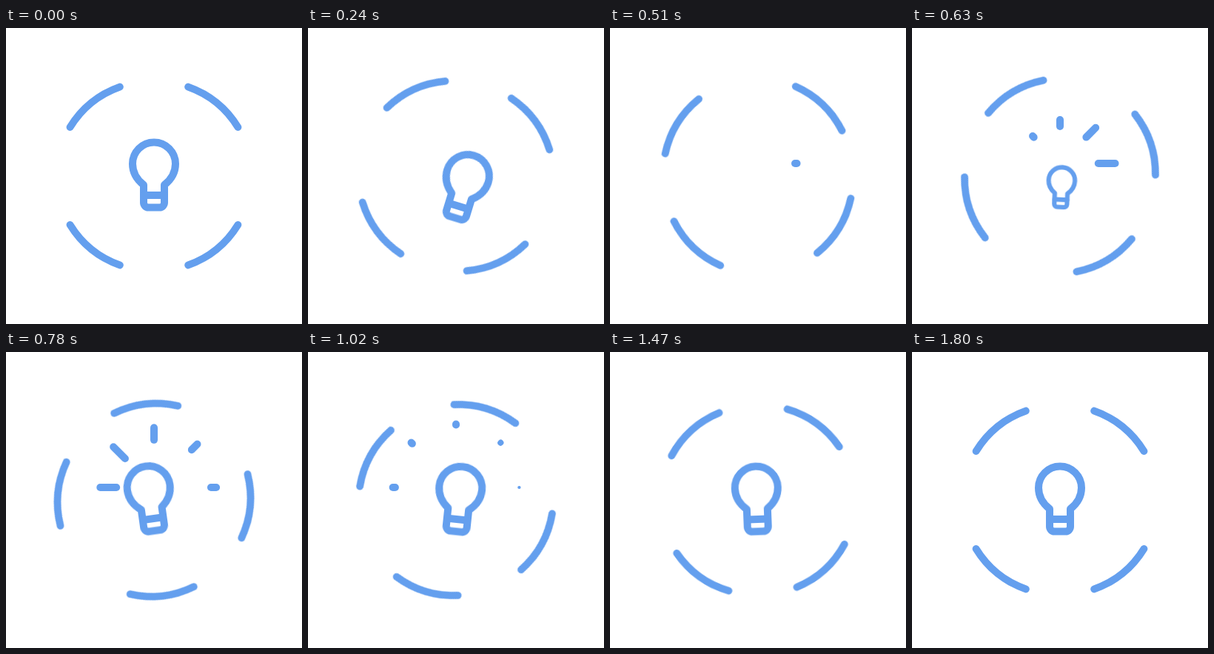
Animation, 400 px wide and 400 px high, one loop 1.83 s. Source, as an HTML page:

```html
<!DOCTYPE html>
<html lang="en">
<head>
<meta charset="utf-8">
<title>Idea bulb</title>
<style>
  @property --from { syntax: "<length>"; inherits: false; initial-value: 0px; }
  @property --to { syntax: "<length>"; inherits: false; initial-value: 0px; }

  html, body { margin: 0; width: 100%; height: 100%; overflow: hidden; background: #fff; }
  svg {
    display: block; width: 100%; height: 100%;
    fill: none; stroke: #649fee; stroke-width: 10;
    stroke-linecap: round; stroke-linejoin: round;
    --loop: 1830ms;
    --swift: cubic-bezier(.333, 0, .133, 1);
  }

  /* Ring: half a turn, which maps the four arcs onto themselves */
  .ring { transform-origin: 200px 200px; animation: turn var(--loop) var(--swift) infinite; }
  @keyframes turn {
    0% { transform: rotate(0deg); }
    98.36%, 100% { transform: rotate(180deg); }
  }

  /* Bulb: tips over and vanishes, pops back, sways to rest */
  .bulb { transform-origin: 200px 243px; animation: bulb var(--loop) ease-in-out infinite; }
  @keyframes bulb {
    0% { transform: translate(0, 0) rotate(0deg) scale(1); animation-timing-function: ease-in; }
    13.115% { transform: translate(-1.5px, 14px) rotate(17deg) scale(1); animation-timing-function: ease-in; }
    23.5% { transform: translate(-1px, 22px) rotate(32deg) scale(0); }
    28.2% { transform: translate(0, 0) rotate(20deg) scale(0); animation-timing-function: ease-out; }
    42.623% { transform: translate(1px, -1px) rotate(-8deg) scale(1); }
    56% { transform: translate(0, 0) rotate(6deg) scale(1); }
    78.5% { transform: translate(0, 0) rotate(-2.2deg) scale(1); }
    98.36%, 100% { transform: translate(0, 0) rotate(0deg) scale(1); }
  }

  /* Rays: the outer end runs ahead, the inner end follows */
  .rays path {
    stroke-dasharray: calc(var(--to) - var(--from)) 99px;
    stroke-dashoffset: calc(-1 * var(--from));
    animation: lead var(--loop) var(--swift) infinite both,
               follow var(--loop) var(--swift) infinite both,
               weight var(--loop) linear infinite both;
    animation-delay: calc(var(--i) * 41ms);
  }
  @keyframes lead {
    0%, 24.86% { --to: .1px; }
    49.18%, 100% { --to: 35.5px; }
  }
  @keyframes follow {
    0%, 31.8% { --from: 0px; }
    56.12%, 100% { --from: 35.3px; }
  }
  @keyframes weight {
    0%, 25.96% { stroke-width: 0; }
    27.3%, 52.3% { stroke-width: 10; }
    58.31%, 100% { stroke-width: 0; }
  }
</style>
</head>
<body>
<svg viewBox="0 0 400 400">
  <g class="ring">
    <path d="M246.2 79.6A130 130 0 0 1 313.4 134"/>
    <path d="M313.4 266A130 130 0 0 1 246.2 320.4"/>
    <path d="M153.8 320.4A130 130 0 0 1 86.6 266"/>
    <path d="M86.6 134A130 130 0 0 1 153.8 79.6"/>
  </g>
  <g class="rays">
    <path style="--i:0" d="M250 183h35.5"/>
    <path style="--i:1" transform="rotate(-45 200 183)" d="M250 183h35.5"/>
    <path style="--i:2" transform="rotate(-90 200 183)" d="M250 183h35.5"/>
    <path style="--i:3" transform="rotate(-135 200 183)" d="M250 183h35.5"/>
    <path style="--i:4" transform="rotate(180 200 183)" d="M250 183h35.5"/>
  </g>
  <g class="bulb">
    <path d="M186 236V212C177 205 171 195 171 183.5A29 29 0 0 1 229 183.5C229 195 223 205 214 212V236a6.5 6.5 0 0 1-6.5 6.5H192.5a6.5 6.5 0 0 1-6.5-6.5Z"/>
    <path d="M186 226H214"/>
  </g>
</svg>
</body>
</html>
```
